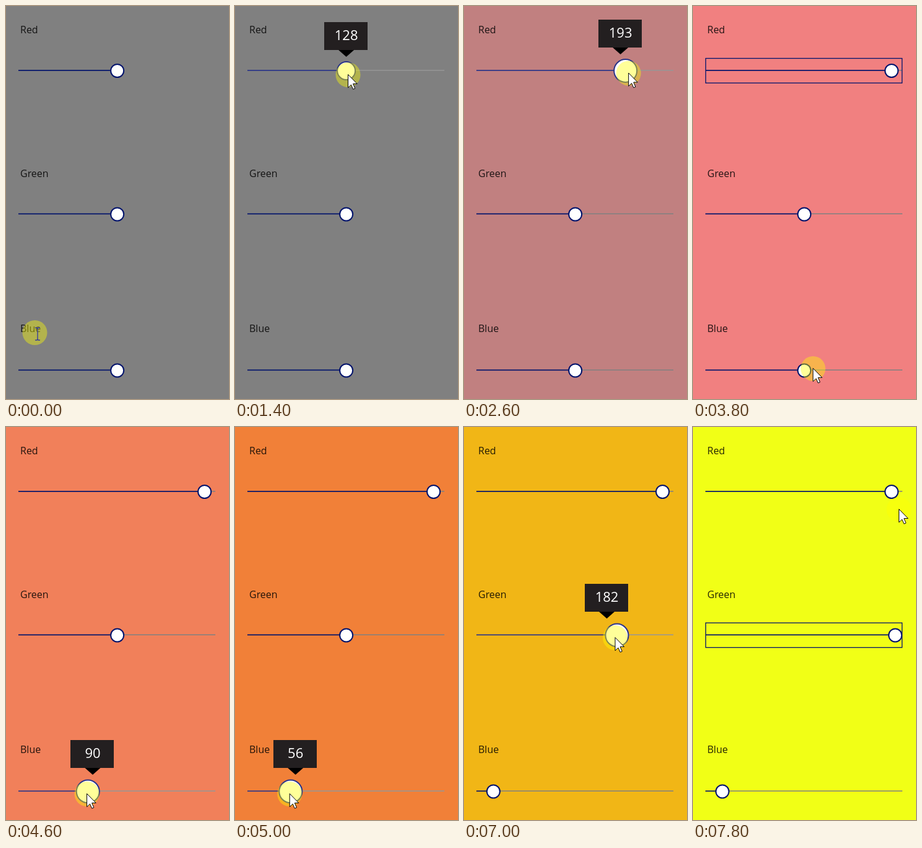
Write an HTML page with a canvas that moves like this. It is 360 px wide and 634 px high and loops after 8000 ms.

```html
<!DOCTYPE html>
<html lang="en">
<head>
<meta charset="utf-8">
<title>Colour sliders</title>
<style>
  html, body { margin: 0; width: 100%; height: 100%; overflow: hidden; background: #808080; }
  canvas { display: block; }
</style>
</head>
<body>
<canvas id="stage" width="360" height="634"></canvas>
<script>
const ctx = document.getElementById('stage').getContext('2d');
const LOOP = 8000, STEP = 200;
const LEFT = 20, RIGHT = 338;
const START_VALUE = 128;
const HOLD = 250;   // time the button stays down after a drag
const LAG = 75;     // delay of the tooltip behind the thumb

// The pointer reaches `grab` at time `arrive`, then drags the thumb from `begin` to `end`.
const red = { label: 'Red', y: 104.5, textY: 44, arrive: 1400, begin: 1800, end: 3200,
  value: 241, grab: { x: 182, y: 110 }, offset: 5, bend: 225 };
const green = { label: 'Green', y: 336, textY: 276, arrive: 6600, begin: 6700, end: 7400,
  value: 255, grab: { x: 175, y: 338 }, offset: -4, bend: 0 };
const blue = { label: 'Blue', y: 588, textY: 526, arrive: 3810, begin: 4150, end: 5400,
  value: 22, grab: { x: 193, y: 585 }, offset: -2, bend: 0 };

const sliders = [red, green, blue];
const dragOrder = [red, blue, green];
dragOrder.forEach((slider, i) => {
  slider.release = slider.end + HOLD;
  slider.blur = i + 1 < dragOrder.length ? dragOrder[i + 1].begin : LOOP;
});

const clamp = (v, lo, hi) => Math.min(hi, Math.max(lo, v));
const mix = (a, b, k) => a + (b - a) * k;
const smooth = k => k * k * (3 - 2 * k);
const toX = value => LEFT + value / 255 * (RIGHT - LEFT);

function exactValue(slider, t) {
  const k = clamp((t - slider.begin) / (slider.end - slider.begin), 0, 1);
  return mix(START_VALUE, slider.value, k);
}
const valueAt = (slider, t) => Math.round(exactValue(slider, t));

// Travel between sliders is eased; drags run evenly.
const waypoints = [
  { t: 0, x: 46, y: 526 },
  ...dragOrder.flatMap(s => {
    const y = s.y + 3;
    const drop = { x: toX(s.value) + s.offset, y };
    return [
      { t: s.arrive, ...s.grab, bend: s.bend, eased: true },
      { t: s.begin, x: toX(START_VALUE) + s.offset, y },
      { t: s.end, ...drop },
      { t: s.release, ...drop }
    ];
  }),
  { t: 7800, x: 332, y: 132, eased: true }
];

function pointerAt(t) {
  const next = waypoints.findIndex(point => point.t > t);
  if (next < 0) return waypoints[waypoints.length - 1];
  const a = waypoints[next - 1], b = waypoints[next];
  const linear = (t - a.t) / (b.t - a.t);
  const k = b.eased ? smooth(linear) : linear;
  return { x: mix(a.x, b.x, k) + (b.bend || 0) * 4 * k * (1 - k), y: mix(a.y, b.y, k) };
}

function fillPolygon(points, color) {
  ctx.beginPath();
  points.forEach(([x, y]) => ctx.lineTo(x, y));
  ctx.closePath();
  ctx.fillStyle = color;
  ctx.fill();
}

function disc(x, y, radius, color) {
  ctx.beginPath();
  ctx.arc(x, y, radius, 0, Math.PI * 2);
  ctx.fillStyle = color;
  ctx.fill();
}

function text(content, x, y, font, color, align) {
  ctx.font = `${font} "Open Sans", sans-serif`;
  ctx.fillStyle = color;
  ctx.textAlign = align;
  ctx.fillText(content, x, y);
}

function drawTooltip(x, tipY, value) {
  const top = tipY - 56;
  ctx.fillStyle = '#231f20';
  ctx.fillRect(Math.round(x - 35.5), top, 70, 45);
  fillPolygon([[x - 12.5, top + 45], [x + 12.5, top + 45], [x, tipY]], '#000');
  text(value, x, top + 29, '500 22px', '#fff', 'center');
}

function drawSlider(slider, t) {
  const { y } = slider;
  const pressed = t >= slider.begin && t < slider.release;
  const active = t >= slider.arrive && t < slider.release;
  const radius = pressed ? 19.5 : active ? 15.5 : 11.5;
  const x = clamp(toX(valueAt(slider, t)), LEFT + radius, RIGHT - radius);
  const accent = active ? '#2a3488' : '#00126b';

  text(slider.label, 23, slider.textY, '16px', 'rgba(0, 0, 0, 0.85)', 'left');

  ctx.fillStyle = active ? '#969696' : '#808080';
  ctx.fillRect(x, y - 1.5, RIGHT - x, 1.5);
  ctx.fillStyle = accent;
  ctx.fillRect(LEFT, y - 1.5, x - LEFT, 1.7);

  if (t >= slider.release && t < slider.blur) {
    ctx.strokeStyle = accent;
    ctx.lineWidth = 1.3;
    ctx.strokeRect(20.5, y - 20, 317, 39.7);
  }

  disc(x, y, radius - 1, '#fff');
  ctx.strokeStyle = accent;
  ctx.lineWidth = 2;
  ctx.stroke();

  if (active) {
    drawTooltip(toX(exactValue(slider, t - LAG)), Math.floor(y - radius - 7), valueAt(slider, t));
  }
}

function drawTextCursor(x, y) {
  ctx.strokeStyle = '#3a3f9a';
  ctx.lineWidth = 1.4;
  ctx.beginPath();
  for (const side of [-1, 1]) {
    ctx.moveTo(x + side * 4, y - 10);
    ctx.lineTo(x + side, y - 10);
    ctx.lineTo(x, y - 8);
    ctx.lineTo(x, y + 8);
    ctx.lineTo(x + side, y + 10);
    ctx.lineTo(x + side * 4, y + 10);
  }
  ctx.stroke();
}

function drawArrow(x, y) {
  const shape = [[0, 0], [0, 17], [4, 13.3], [6.5, 19], [9, 18], [6.5, 12], [11.7, 12]];
  fillPolygon(shape.map(([dx, dy]) => [x + dx * 1.25, y + dy * 1.25]), '#fff');
  ctx.strokeStyle = '#000';
  ctx.lineWidth = 1;
  ctx.stroke();
}

function drawPointer(t) {
  const { x, y } = pointerAt(t);
  disc(x + 0.5, y + 1, 20, 'rgba(255, 255, 0, 0.4)');
  if (t < STEP) drawTextCursor(x + 5, y + 3);
  else drawArrow(x + 0.5, y + 0.5);
}

function draw(time) {
  const t = Math.floor(time % LOOP / STEP) * STEP;
  ctx.fillStyle = `rgb(${sliders.map(slider => valueAt(slider, t)).join()})`;
  ctx.fillRect(0, 0, 360, 634);
  sliders.forEach(slider => drawSlider(slider, t));
  drawPointer(t);
}

const start = performance.now();
function tick() {
  draw(performance.now() - start);
  requestAnimationFrame(tick);
}
tick();
</script>
</body>
</html>
```
